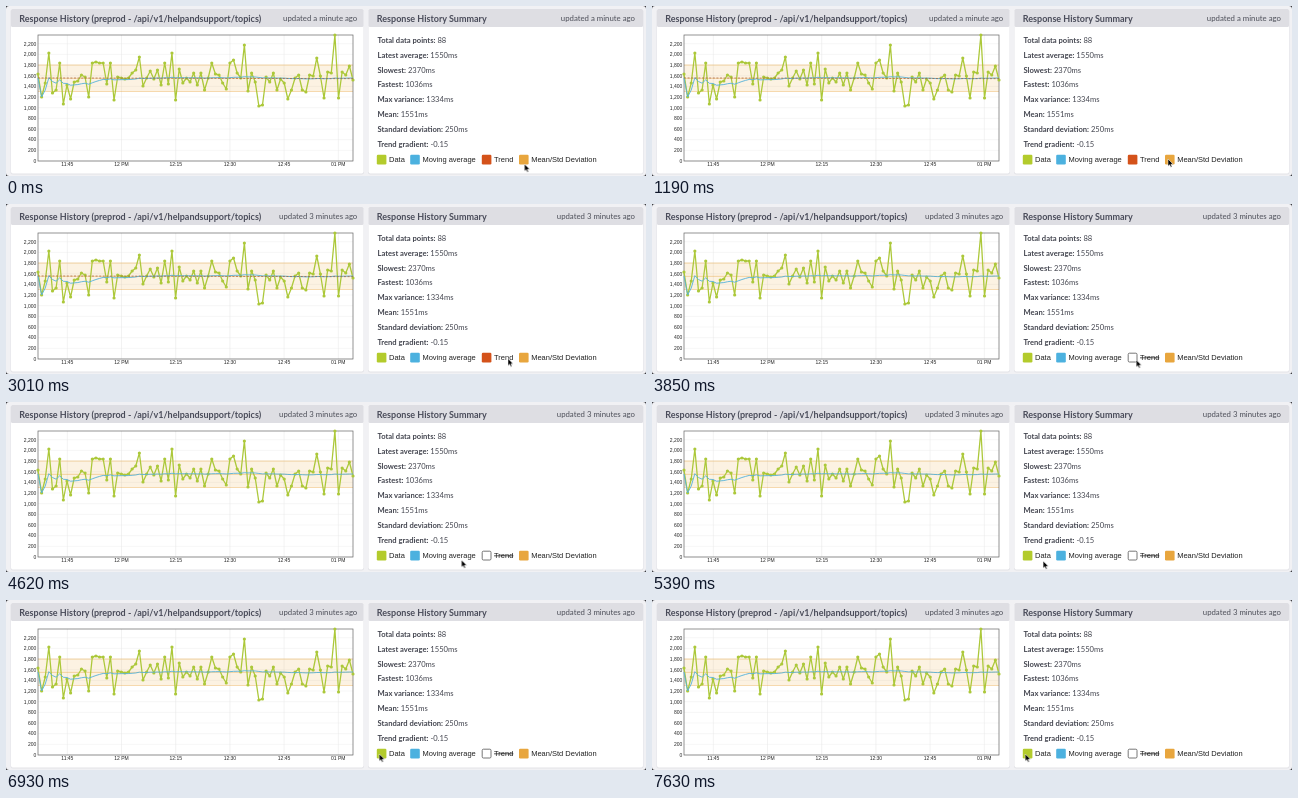
These frames come from a looping animation (640 by 170 pixels, 7700 ms). An HTML page:

```html
<!DOCTYPE html>
<html lang="en">
<head>
<meta charset="utf-8">
<title>Response History</title>
<style>
  html, body { margin: 0; width: 100%; height: 100%; overflow: hidden; background: #2b2b31; }
  svg { display: block; width: 640px; height: 170px; }
  text { font-family: Lato, "Open Sans", sans-serif; fill: #43454f; }
  .title { font-size: 9px; font-weight: 700; fill: #4a4c5a; }
  .age { font-size: 7.8px; text-anchor: end; fill: #4c4e58; }
  .stat { font-size: 7.6px; }
  .stat .label { font-weight: 700; }
  .key { font: 7.5px "Liberation Sans", Arial, sans-serif; fill: #222; }
  .axis { font: 5px "Liberation Sans", Arial, sans-serif; fill: #222; }
  .off .key { text-decoration: line-through; }

  .anim { animation: 7700ms step-end infinite; }
  .fresh { animation-name: fresh; }
  .stale { animation-name: stale; }
  .mean-on { animation-name: mean-on; }
  .mean-off { animation-name: mean-off; }
  .trend-on { animation-name: trend-on; }
  .trend-off { animation-name: trend-off; }
  .cursor { animation: cursor 7700ms ease-in-out infinite; }

  @keyframes fresh { 0% { opacity: 1 } 18.18%, 100% { opacity: 0 } }
  @keyframes stale { 0% { opacity: 0 } 18.18%, 100% { opacity: 1 } }
  @keyframes mean-on { 0% { opacity: 1 } 18.18% { opacity: 0 } 32.73%, 100% { opacity: 1 } }
  @keyframes mean-off { 0% { opacity: 0 } 18.18% { opacity: 1 } 32.73%, 100% { opacity: 0 } }
  @keyframes trend-on { 0% { opacity: 1 } 46.36%, 100% { opacity: 0 } }
  @keyframes trend-off { 0% { opacity: 0 } 46.36%, 100% { opacity: 1 } }
  @keyframes cursor {
    0%, 4% { transform: translate(518.5px, 158px) }
    10.5%, 33% { transform: translate(516px, 153px) }
    38.5%, 47% { transform: translate(502px, 154.5px) }
    54%, 60.5% { transform: translate(455.5px, 158px) }
    66% { transform: translate(410px, 162px) }
    74%, 81% { transform: translate(372.5px, 156px) }
    85%, 100% { transform: translate(373.3px, 154px) }
  }
</style>
</head>
<body>
<svg id="stage" viewBox="0 0 640 170" xmlns="http://www.w3.org/2000/svg"></svg>
<script>
const NS = 'http://www.w3.org/2000/svg';
const stage = document.getElementById('stage');

function add(parent, tag, attrs = {}, text) {
  const node = document.createElementNS(NS, tag);
  for (const name in attrs) node.setAttribute(name, attrs[name]);
  if (text !== undefined) node.textContent = text;
  parent.appendChild(node);
  return node;
}
const rect = (parent, x, y, width, height, fill, more) =>
  add(parent, 'rect', { x, y, width, height, fill, ...more });
const line = (parent, d, stroke, width, more) =>
  add(parent, 'path', { d, stroke, 'stroke-width': width, fill: 'none', ...more });
const label = (parent, x, y, cls, text, more) =>
  add(parent, 'text', { x, y, class: cls, ...more }, text);
const group = (cls) => add(stage, 'g', { class: cls });

// Panels and headers
rect(stage, 0, 0, 640, 170, '#f1f1f4', { rx: 3 });
function panel(x, width, title, right) {
  rect(stage, x - .5, 3.5, width + 1, 165, '#e4e4e8', { rx: 2 });
  rect(stage, x, 3, width, 164.5, '#fff', { rx: 2 });
  rect(stage, x, 3, width, 18, '#dedee3', { rx: 1.5 });
  label(stage, x + 8.3, 15.6, 'title', title);
  label(stage, right, 15.4, 'age anim fresh', 'updated a minute ago');
  label(stage, right, 15.4, 'age anim stale', 'updated 3 minutes ago');
}
panel(5, 352.5, 'Response History (preprod - /api/v1/helpandsupport/topics)', 351.3);
panel(362.5, 274.5, 'Response History Summary', 629);

// Chart
const LEFT = 32, RIGHT = 347, TOP = 29, BASE = 155;
const yOf = (value) => BASE - value * .0533;

for (let v = 0; v <= 2200; v += 200) {
  const y = yOf(v);
  line(stage, `M${LEFT} ${y}H${RIGHT}`, '#ececec', .5);
  label(stage, 30.3, y + 1.8, 'axis', v.toLocaleString('en-US'), { 'text-anchor': 'end' });
}
['11:45', '12 PM', '12:15', '12:30', '12:45', '01 PM'].forEach((time, i) => {
  const x = 61.3 + i * 54.2;
  line(stage, `M${x} ${TOP}V${BASE}`, '#e4e4e4', .5);
  label(stage, x, 160.2, 'axis', time, { 'text-anchor': 'middle' });
});

const MEAN = 1551, DEV = 250;
const band = group('anim mean-on');
rect(band, LEFT, yOf(MEAN + DEV), RIGHT - LEFT, DEV * 2 * .0533, '#e8a53c', { 'fill-opacity': .15 });
for (const v of [MEAN - DEV, MEAN, MEAN + DEV])
  line(band, `M${LEFT} ${yOf(v)}H${RIGHT}`, '#e8a53c', .6, { opacity: .7 });

rect(stage, LEFT, TOP, RIGHT - LEFT, BASE - TOP, 'none', { stroke: '#666', 'stroke-width': .7 });

// Heights of the samples, evenly spaced in time
const data = [
  68, 91, 77, 47, 87, 84, 57, 98, 79, 93, 76, 75, 69, 71, 91, 57, 56, 57, 57, 78, 57, 94,
  71, 72, 73, 72, 67, 64, 51, 80, 72, 65, 73, 64, 79, 57, 78, 47, 94, 63, 77, 72, 76, 67,
  79, 67, 84, 72, 57, 68, 69, 77, 83, 57, 54, 67, 72, 39, 85, 67, 76, 100, 99, 71, 76, 67,
  84, 73, 77, 93, 84, 72, 69, 84, 86, 69, 70, 52, 70, 92, 66, 67, 29, 92, 66, 69, 60, 74
];
const xOf = (i) => LEFT + i * (RIGHT - LEFT) / (data.length - 1);
const pathOf = (ys) => 'M' + ys.map((y, i) => `${xOf(i).toFixed(2)} ${y.toFixed(2)}`).join('L');

let sum = 0;
const average = data.map((y, i) => i ? (sum += y) / i : 72);

line(stage, pathOf(data), '#acc83a', 1.3, { 'stroke-linejoin': 'round' });
data.forEach((y, i) => add(stage, 'circle', { cx: xOf(i), cy: y, r: 1.6, fill: '#acc83a' }));
line(stage, pathOf(average), '#55b2d8', .9);
line(group('anim trend-on'), `M${LEFT} ${yOf(1558)}L${RIGHT} ${yOf(1545)}`, '#a3593a', .7,
  { 'stroke-dasharray': '2 1.6' });

// Summary
[
  ['Total data points:', '88'], ['Latest average:', '1550ms'], ['Slowest:', '2370ms'],
  ['Fastest:', '1036ms'], ['Max variance:', '1334ms'], ['Mean:', '1551ms'],
  ['Standard deviation:', '250ms'], ['Trend gradient:', '-0.15']
].forEach(([name, value], i) => {
  const row = add(stage, 'text', { x: 371.5, y: 36.7 + i * 14.9, class: 'stat' });
  add(row, 'tspan', { class: 'label' }, name);
  add(row, 'tspan', {}, ' ' + value);
});

// Legend
function key(x, name, color, cls = '') {
  const on = group(cls && `anim ${cls}-on`);
  rect(on, x, 148.8, 9.6, 9.6, color, { rx: 1.2 });
  label(on, x + 12.2, 156.2, 'key', name);
  if (!cls) return;
  const off = add(group(`anim ${cls}-off`), 'g', { class: 'off' });
  rect(off, x + .4, 149.2, 8.8, 8.8, '#fff', { rx: 1.2, stroke: '#555', 'stroke-width': .8 });
  label(off, x + 12.2, 156.2, 'key', name);
}
key(370.8, 'Data', '#b3cb2c');
key(404.2, 'Moving average', '#4cb1df');
key(475.8, 'Trend', '#d4521a', 'trend');
key(513, 'Mean/Std Deviation', '#e8a63e', 'mean');

// Pointer
add(group('cursor'), 'path', {
  d: 'M0 0V7.2L1.7 5.7L2.8 8.2L4 7.7L2.9 5.2H5.2Z',
  fill: '#000', stroke: '#fff', 'stroke-width': .5, 'stroke-linejoin': 'round'
});
</script>
</body>
</html>
```
